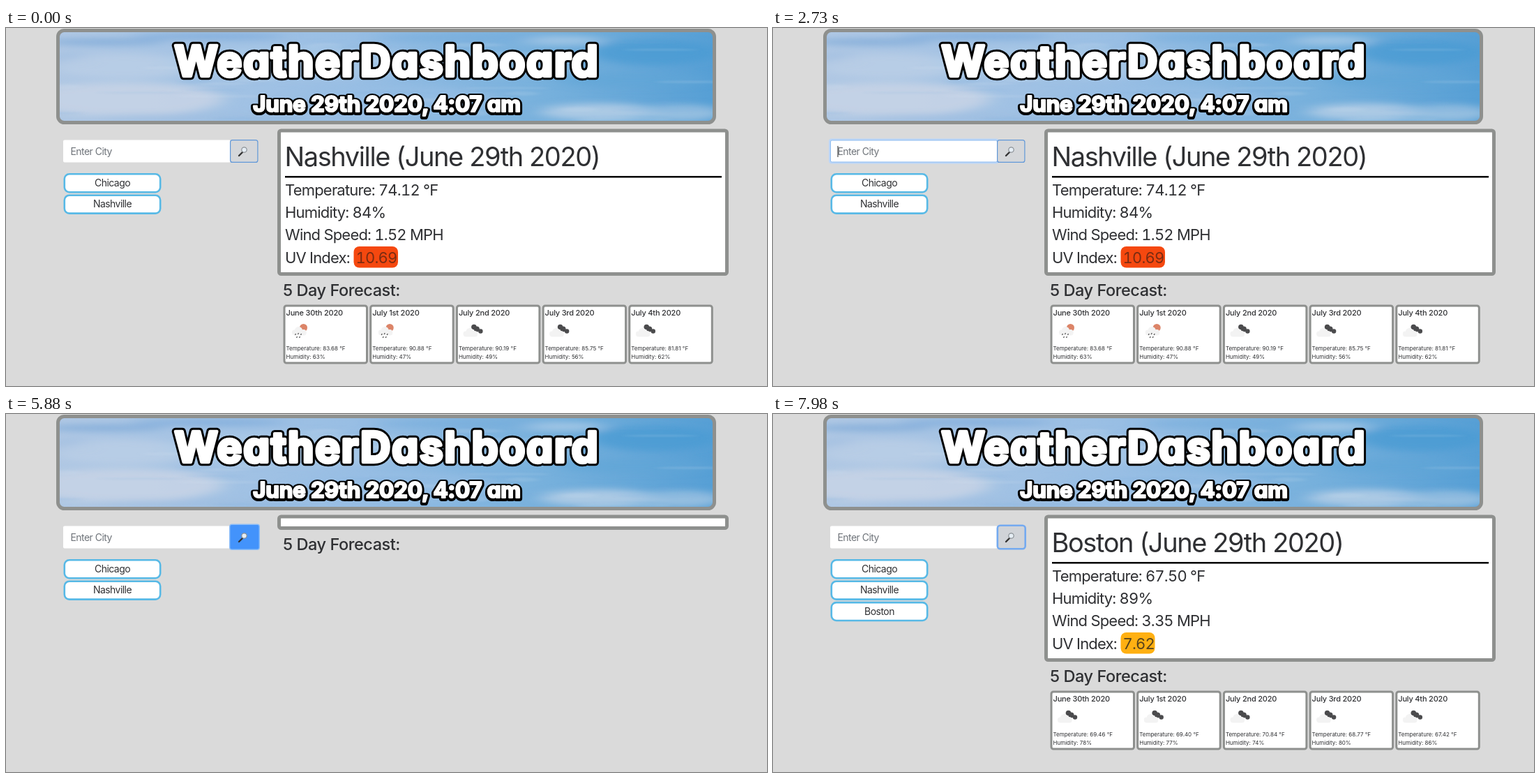
Recreate the animation shown at these times as an HTML page. Size 1091x513 px, loop 8000 ms.

```html
<!DOCTYPE html>
<html lang="en">
<head>
<meta charset="utf-8">
<title>Weather dashboard</title>
<style>
  html, body { margin: 0; width: 100%; height: 100%; overflow: hidden; background: #dadada; }
  svg { display: block; width: 1091px; height: 513px; font-family: Inter, Roboto, sans-serif; fill: #2f3033; }
  .title { font-weight: 700; font-feature-settings: "cv11"; fill: #fff; stroke-linejoin: round; text-anchor: middle; }
  .back { fill: #000; stroke: #000; }
  .front { stroke: #fff; }
  .city { font-size: 38px; letter-spacing: -1.4px; }
  .row { font-size: 22px; letter-spacing: -.8px; font-variant-numeric: tabular-nums; }
  .head { font-size: 23.5px; font-weight: 500; letter-spacing: -.45px; }
  .date { font-size: 11px; font-weight: 500; letter-spacing: -.2px; }
  .tiny { font-size: 8px; }
  .ui { font-size: 14px; letter-spacing: -.55px; }
  .mid { text-anchor: middle; }
  .hint { fill: #6f747a; }
</style>
</head>
<body>
<svg id="stage" viewBox="0 0 1091 513"></svg>
<script>
const LOOP = 8000, FOCUS = 2300, TYPE = 3750, KEY = 170, HOVER = 5600, SEND = 5740, RESULT = 6370, LEAVE = 7770;
const GREY = '#8e908e', WORD = 'Boston';

const box = (x, y, w, h, r, fill, stroke = 'none', sw = 0) =>
  `<rect x="${x + sw / 2}" y="${y + sw / 2}" width="${w - sw}" height="${h - sw}" rx="${r}" fill="${fill}" stroke="${stroke}" stroke-width="${sw}"/>`;
const text = (cls, x, y, s, extra = '') => `<text class="${cls}" x="${x}" y="${y}" ${extra}>${s}</text>`;
const blob = (x, y, rx, ry, fill, o = 1) =>
  `<ellipse cx="${x}" cy="${y}" rx="${rx}" ry="${ry}" fill="${fill}" opacity="${o}"/>`;
const disc = (x, y, r, fill) => blob(x, y, r, r, fill);

let seed = 7;
const rnd = () => (seed = seed * 16807 % 2147483647) / 2147483647;

function sky() {
  let s = box(75, 4, 940, 131, 6, 'url(#sky)');
  const soft = [
    [140, 20, 90, 5, '#7fabd9', .8], [290, 12, 110, 5, '#79a9da', .7], [95, 45, 30, 10, '#98b9e0', .5],
    [170, 102, 140, 24, '#c6d3e6', .9], [170, 55, 100, 18, '#bbcfe7', .8], [420, 50, 190, 24, '#aecbe8', .6],
    [280, 128, 150, 5, '#9dbce0', .6], [560, 105, 150, 22, '#98bfe4', .6], [700, 55, 120, 14, '#98c1e4', .6],
    [800, 18, 60, 6, '#b5d1ea', .7], [930, 35, 90, 18, '#4a9cd4', .8], [900, 75, 110, 10, '#62a6d8', .6],
    [850, 120, 85, 12, '#b2cde6', .9], [970, 122, 60, 12, '#a2c5e3', .8], [650, 14, 120, 6, '#72aadb', .5]
  ];
  s += `<g filter="url(#soft)">${soft.map(b => blob(...b)).join('')}</g><g filter="url(#fine)">`;
  for (let i = 0; i < 40; i++)
    s += blob(75 + rnd() * 940, 6 + rnd() * 126, 20 + rnd() * 50, 1 + rnd() * 3, rnd() < .55 ? '#d3e0ee' : '#78acdb', .15);
  return `<g clip-path="url(#banner)">${s}</g></g>` + box(72, 1, 946, 137, 9, 'none', GREY, 5);
}

function title(y, size, gap, sw, s) {
  const style = w => `style="font-size:${size}px;letter-spacing:${gap}px;stroke-width:${w}px"`;
  return text('title back', 546, y + .5, s, style(sw + 6)) + text('title front', 546, y, s, style(sw));
}

function icon(x, rain) {
  const white = '#f3f3f3', dark = '#4b4b4d';
  const cloud = disc(x + 14, 438, 3.5, white) + disc(x + 20, 435.5, 5.5, white) +
    disc(x + 27, 438, 4, white) + box(x + 11, 435.5, 20, 7, 3.5, white);
  if (!rain)
    return disc(x + 26, 428.5, 3.8, dark) + disc(x + 30, 431.5, 4, dark) + disc(x + 35.5, 434.5, 3.2, dark) + cloud;
  const drops = [[18, 438], [22, 437], [26, 438], [20, 442], [24, 442]]
    .map(([dx, y]) => `<path d="M${x + dx} ${y}l-1 2" stroke="#555" stroke-width="1.3"/>`).join('');
  return disc(x + 29, 429.5, 5.5, '#dc8468') + `<g transform="translate(2 -2)">${cloud}</g>` + drops;
}

const days = ['June 30th', 'July 1st', 'July 2nd', 'July 3rd', 'July 4th'];

function report(id, city, temp, hum, wind, uv, uvFill, uvInk, uvWidth, rainy, temps, hums) {
  const rows = [`Temperature: ${temp} °F`, `Humidity: ${hum}%`, `Wind Speed: ${wind} MPH`, 'UV Index:'];
  const cards = days.map((d, i) => {
    const x = 397.5 + i * 123.7;
    return box(x, 396.5, 121.5, 85, 3, '#fff', GREY, 3) + text('date', x + 4, 411.5, d + ' 2020') + icon(x, i < rainy) +
      text('tiny', x + 4, 462, `Temperature: ${temps[i]} °F`) + text('tiny', x + 4, 473.5, `Humidity: ${hums[i]}%`);
  });
  return `<g id="${id}">` + box(389, 144.5, 647, 210.5, 3, '#fff', GREY, 5) +
    text('city', 399.5, 198, city + ' (June 29th 2020)') + box(400, 212, 626, 2.5, 0, '#000') +
    rows.map((r, i) => text('row', 400, 239.5 + i * 32.4, r)).join('') +
    box(498.5, 313, uvWidth, 30.5, 8, uvFill) + text('row', 501.5, 336.7, uv, `style="fill:${uvInk}"`) +
    text('head', 397, 384, '5 Day Forecast:') + cards.join('') + '</g>';
}

const cityButton = (name, i) => `<g id="city${i}">` + box(82.5, 208 + i * 30.4, 140, 28.5, 7, '#fff', '#57b9e6', 2.6) +
  text('ui mid', 152.5, 227 + i * 30.4, name) + '</g>';

const stage = document.getElementById('stage');
stage.innerHTML = `<defs>
  <linearGradient id="sky"><stop offset="0" stop-color="#b0c8e4"/><stop offset=".45" stop-color="#98bee4"/>
    <stop offset=".75" stop-color="#76b0dc"/><stop offset="1" stop-color="#569fd5"/></linearGradient>
  <filter id="soft" x="-20%" y="-50%" width="140%" height="200%"><feGaussianBlur stdDeviation="14 5"/></filter>
  <filter id="fine"><feGaussianBlur stdDeviation="6 1.3"/></filter>
  <clipPath id="banner">${box(75, 4, 940, 131, 6)}</clipPath></defs>` +
  sky() + title(68.5, 60, 1.9, 4.5, 'WeatherDashboard') + title(120, 31.5, -.2, 2.2, 'June 29th 2020, 4:07 am') +
  box(82, 160.5, 240, 32, 2, '#fff') +
  `<g id="focus">${box(80, 158.5, 243.5, 36, 4, '#bcd6f7')}${box(82, 160.5, 240, 32, 2, '#fff', '#8fbdf0', 1)}</g>` +
  `<g id="idle">${box(321, 160, 40.5, 33, 3, '#d5d7da', '#5f97d8', 1.2)}</g>` +
  `<g id="hot">${box(320, 157.5, 44, 37.5, 4, '#8abcf8')}${box(321.5, 159, 41, 34.5, 2, '#4393fb')}</g>` +
  `<g id="ring">${box(320.5, 158.5, 42.5, 36, 4, '#d0d3d8', '#74aaf0', 2.6)}</g>` +
  `<path d="M339 178l-5 5" stroke="#333" stroke-width="2.4" stroke-linecap="round"/>` +
  `<circle cx="341.5" cy="174.5" r="3.7" fill="#e6eef5" stroke="#888e94" stroke-width="1.2"/>` +
  text('ui', 92.5, 182, '', 'id="entry"') + box(93, 169, 1, 16, 0, '#222').replace('<rect', '<rect id="caret"') +
  ['Chicago', 'Nashville', WORD].map(cityButton).join('') +
  `<g id="empty">${box(389, 144.5, 647, 21.5, 3, '#fff', GREY, 5)}${text('head', 397, 194.5, '5 Day Forecast:')}</g>` +
  report('before', 'Nashville', '74.12', 84, '1.52', '10.69', '#f5480f', '#7b2c12', 63.5, 2,
    ['83.68', '90.88', '90.19', '85.75', '81.81'], [63, 47, 49, 56, 62]) +
  report('after', WORD, '67.50', 89, '3.35', '7.62', '#ffb012', '#57431c', 49, 0,
    ['69.46', '69.40', '70.84', '68.77', '67.42'], [78, 77, 74, 80, 86]);

const el = id => document.getElementById(id);
const show = (id, on) => el(id).style.display = on ? '' : 'none';

function draw(t) {
  const typed = t < SEND ? WORD.slice(0, Math.max(0, Math.floor((t - TYPE) / KEY) + 1)) : '';
  const focused = t >= FOCUS && t < SEND;
  const entry = el('entry');
  entry.textContent = typed || 'Enter City';
  entry.setAttribute('class', typed ? 'ui' : 'ui hint');

  // The caret restarts its blink at every key.
  const since = t - (typed ? TYPE + (typed.length - 1) * KEY : FOCUS);
  show('caret', focused && since % 1000 < 500);
  if (focused) el('caret').setAttribute('x', typed ? 93 + entry.getComputedTextLength() : 92.5);

  show('focus', focused);
  show('idle', t < HOVER);
  show('hot', t >= HOVER && t < LEAVE);
  show('ring', t >= LEAVE);
  show('before', t < SEND);
  show('empty', t >= SEND && t < RESULT);
  show('after', t >= RESULT);
  show('city2', t >= RESULT);
}

const start = performance.now();
function tick() {
  draw((performance.now() - start) % LOOP);
  requestAnimationFrame(tick);
}
tick();
</script>
</body>
</html>
```
